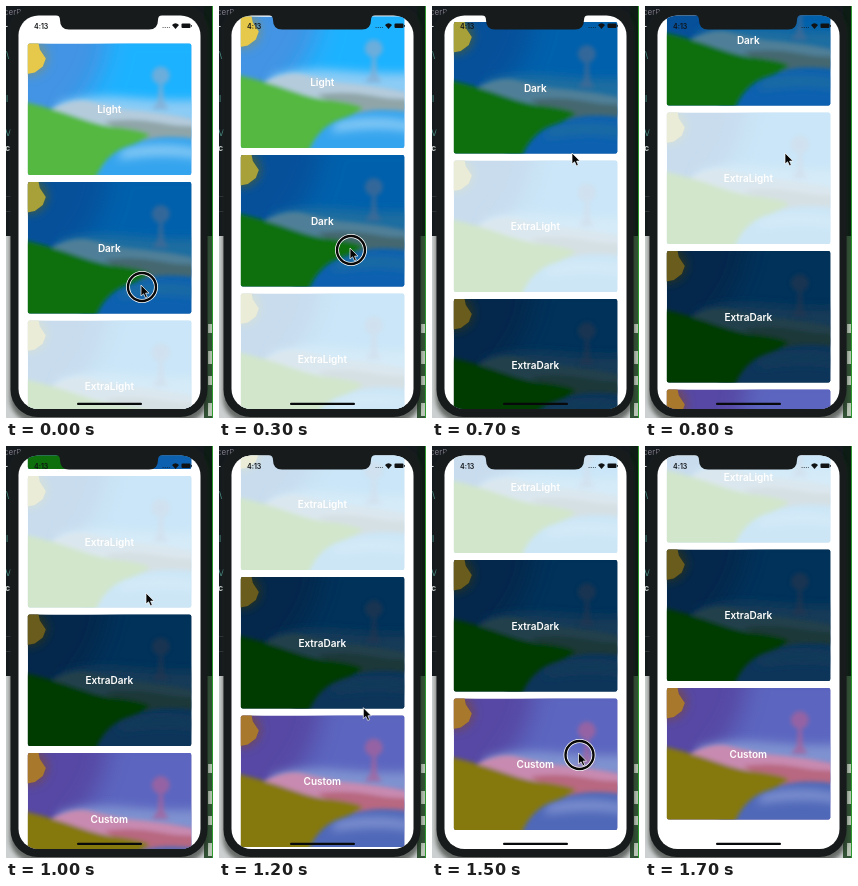
An HTML page for the animation above (1.8 s loop, 207 by 412 pixels).

```html
<!DOCTYPE html>
<html lang="en">
<head>
<meta charset="utf-8">
<style>
  html, body { margin: 0; height: 100%; overflow: hidden; background: #151a1e; }
  svg { display: block; width: 207px; height: 412px; font-family: Inter, Roboto, sans-serif; }
  .label { font-size: 10px; font-weight: 600; fill: #fff; text-anchor: middle; }
  .code { font-size: 9px; fill: #4f9a90; }
  .code .bold { fill: #d5dad8; font-weight: 700; }
</style>
</head>
<body>
<svg viewBox="0 0 207 412">
  <defs>
    <filter id="soft" x="-30%" y="-30%" width="160%" height="160%"><feGaussianBlur stdDeviation="2"/></filter>
    <filter id="haze" x="-50%" y="-50%" width="200%" height="200%"><feGaussianBlur stdDeviation="5"/></filter>
    <filter id="wide" x="-50%" y="-50%" width="200%" height="200%"><feGaussianBlur stdDeviation="12"/></filter>
    <clipPath id="card"><rect width="163.5" height="131.5" rx="2"/></clipPath>
    <clipPath id="screen"><rect x="12.5" y="9.5" width="182" height="393.5" rx="20"/></clipPath>
    <g id="scene" clip-path="url(#card)">
      <rect width="164" height="132" style="fill:var(--sky)"/>
      <path d="M80 -20H200V75H40Q85 30 80 -20" style="fill:var(--glow)" filter="url(#wide)"/>
      <g filter="url(#haze)">
        <path d="M30 60Q60 50 100 54T180 56V80H30Z" style="fill:var(--haze)"/>
        <circle cx="2" cy="14" r="18" style="fill:var(--halo)"/>
      </g>
      <path d="M60 84L175 86V145H50Z" style="fill:var(--water)" filter="url(#soft)"/>
      <path d="M95 106Q135 97 175 107V116Q140 108 90 116Z" style="fill:var(--haze)" filter="url(#haze)"/>
      <g filter="url(#soft)">
        <path d="M22 66Q46 54 62 58T98 66Q130 68 170 76V86Q120 84 92 84T22 70Z" style="fill:var(--cloud)"/>
        <path d="M76 78Q105 74 130 79T172 82V96Q135 90 112 98Z" style="fill:var(--shore)"/>
        <path d="M-5 58Q25 65 50 74T92 84Q120 88 122 92Q112 99 96 104Q74 114 66 140H-5Z" style="fill:var(--hill)"/>
      </g>
      <path d="M-4 -4H10L12 6L18 15L15 23L7 29L-4 31Z" style="fill:var(--sun)"/>
      <g style="fill:var(--tower)" filter="url(#soft)" opacity=".75">
        <circle cx="133" cy="32" r="9"/>
        <path d="M131.500 38H135L136 58L141 66H124L130 58Z"/>
      </g>
    </g>
  </defs>

  <rect y="230" width="207" height="182" fill="#cdd0d0"/>
  <path d="M0 190.500H207M0 205.500H207" stroke="#30363a"/>
  <rect x="198" width="9" height="230" fill="#0d1c14"/>
  <rect x="198" y="230" width="9" height="182" fill="#335436"/>
  <path d="M204 318V412" stroke="#b9c4b6" stroke-width="4" stroke-dasharray="9 18 13 12"/>
  <path d="M206.500 0V412" stroke="#2c9a2c"/>
  <g class="code">
    <text x="-2" y="9" font-size="8" style="fill:#7f7b88">cerPr</text>
    <text class="bold" x="-2" y="23">-</text><text x="0" y="52">\</text>
    <text x="0" y="96">l</text><text x="-1" y="130">V</text><text class="bold" x="-1" y="145">c</text>
  </g>
  <rect x="4" y="2" width="198" height="414" rx="24" fill="#202824" opacity=".6" filter="url(#soft)"/>
  <rect x="4.500" y="-1" width="197" height="412" rx="27" fill="#171b1c"/>

  <g clip-path="url(#screen)">
    <rect x="12" y="9" width="183" height="395" fill="#fff"/>
    <g id="list"></g>
    <g fill="#101214">
      <text x="28" y="22.600" font-size="7" font-weight="600">4:13</text>
      <path d="M156.500 21.500H164" fill="none" stroke="#101214" opacity=".6" stroke-dasharray="1.2 1"/>
      <path d="M166 19Q169.500 15.500 173 19L169.500 23Z"/>
      <rect x="175.500" y="17.500" width="9" height="4.600" rx="1"/>
      <rect x="185" y="19" width=".8" height="1.800"/>
    </g>
    <rect x="71" y="396.800" width="65" height="2.200" rx="1.100" fill="#08090a"/>
  </g>
  <path d="M50 9H156Q152 9.500 152 14Q152 23.500 143 23.500H63Q54 23.500 54 14Q54 9.500 50 9" fill="#171b1c"/>

  <g id="pointer">
    <g id="ring" fill="none">
      <circle cx="1" cy="1" r="14" stroke="#fff" stroke-width="4"/>
      <circle cx="1" cy="1" r="14" stroke="#080808" stroke-width="2.400"/>
    </g>
    <path d="M0 -1V10L2.600 7.800L4.400 11.800L6.300 11L4.600 7.100H8Z" fill="#050505" stroke="#fff" stroke-width=".7"/>
  </g>
</svg>
<script>
const parts = ['sky', 'glow', 'haze', 'cloud', 'hill', 'water', 'shore', 'sun', 'halo', 'tower'];
const themes = {
  Light: '#4394e4 #1fb2ff #8accf6 #b4cbdc #55b840 #35a4ee #8fa5a8 #e6c84a #6f9390 #86acd0',
  Dark: '#06509a #0560ac #1f6da0 #507f98 #077007 #0a60b0 #44686f #a8a038 #3c5c48 #456a94',
  ExtraLight: '#c8dcee #cae6f8 #d5ebf8 #dbe7ee #d2e6cc #cce6f6 #d5e0e4 #eaecd8 #d5e0da #d3dfec',
  ExtraDark: '#04284c #04305a #123a58 #24404c #053a05 #07345a #1c3838 #6a5c1c #253020 #233650',
  Custom: '#5648a4 #5c66c0 #7f92d0 #c88ab0 #85780c #5068b8 #b86880 #a8782c #70485c #a8629a'
};

const byId = id => document.getElementById(id);
const list = byId('list'), pointer = byId('pointer'), ring = byId('ring');

list.innerHTML = Object.entries(themes).map(([name, colors], i) => {
  const vars = colors.split(' ').map((c, k) => `--${parts[k]}:${c}`).join(';');
  return `<g transform="translate(21.8 ${37.5 + i * 138.5})">
    <use href="#scene" style="${vars}"/>
    <text class="label" x="81.5" y="69.6">${name}</text></g>`;
}).join('');

// Scroll offset at every 100 ms step
const scroll = [0, 4, 14, 27, 42, 57, 105, 160, 208, 250, 284.5, 309, 322, 328, 332, 339, 346, 349.5];
// Pointer poses: step, x, y
const poses = [[0, 135, 280], [3, 131, 243], [5, 129.5, 211], [6, 134, 165], [7, 140, 148],
  [10, 140, 148], [13, 146.5, 320], [14, 146.5, 315], [16, 146.5, 301], [17, 146.5, 301]];

function poseAt(step) {
  const i = Math.max(1, poses.findIndex(p => p[0] >= step));
  const [a, b] = [poses[i - 1], poses[i]];
  const u = (step - a[0]) / (b[0] - a[0]);
  return [a[1] + (b[1] - a[1]) * u, a[2] + (b[2] - a[2]) * u];
}

function draw(now) {
  const step = Math.floor(now % 1800 / 100);
  const pressed = step <= 6 || (step >= 13 && step <= 15);
  list.setAttribute('transform', `translate(0 ${-scroll[step]})`);
  pointer.setAttribute('transform', `translate(${poseAt(step)})`);
  pointer.style.display = step < 17 ? '' : 'none';
  ring.style.display = pressed ? '' : 'none';
  requestAnimationFrame(draw);
}
draw(performance.now());
</script>
</body>
</html>
```
